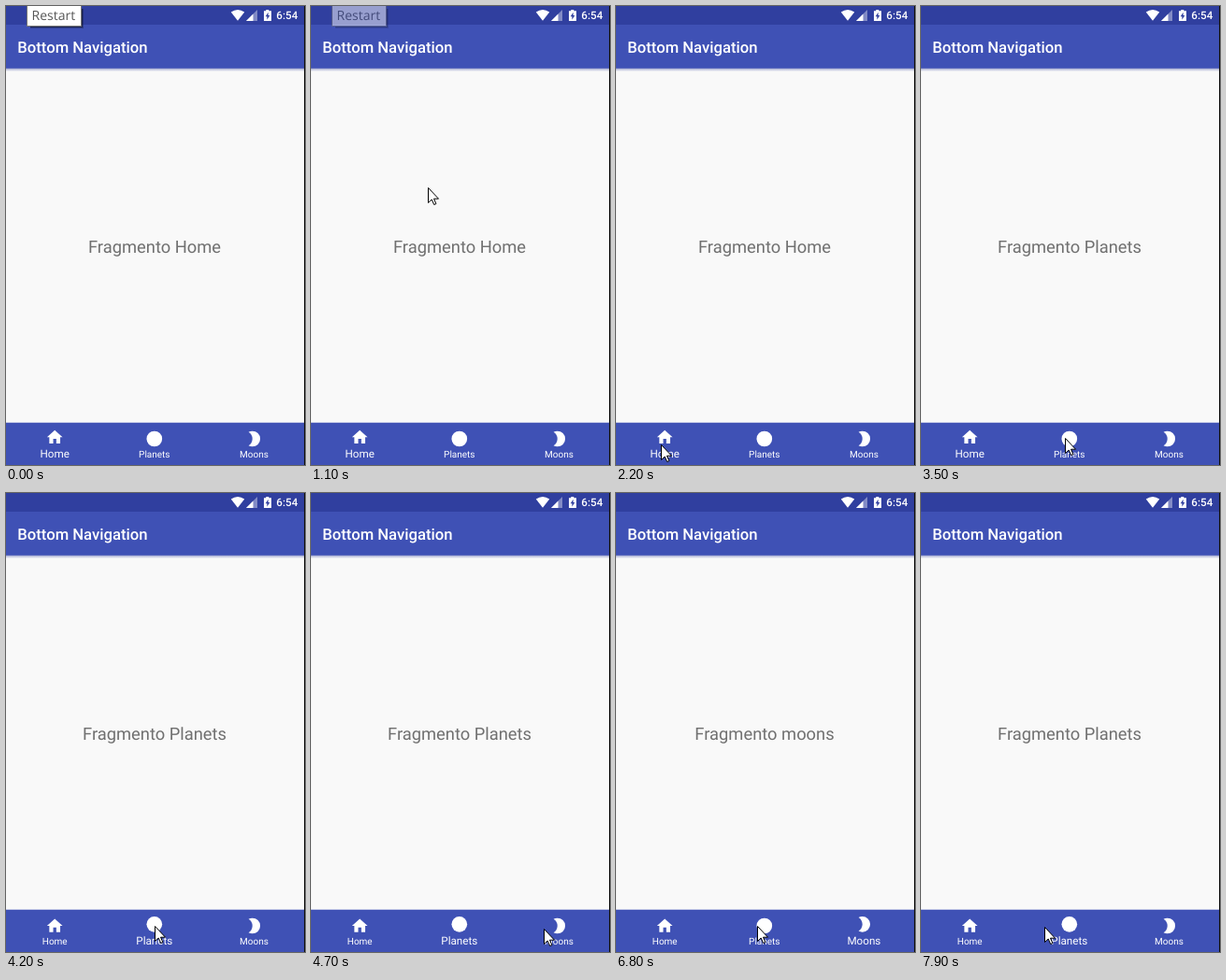
Recreate the animation shown at these times as an HTML page. Size 320 by 491 pixels, loop 8 s.

```html
<!DOCTYPE html>
<html lang="en">
<head>
<meta charset="utf-8">
<title>Bottom Navigation</title>
<style>
  html, body { margin: 0; height: 100%; overflow: hidden; background: #f9f9f9; }
  svg { display: block; width: 100vw; height: 100vh; font-family: Roboto, sans-serif; text-rendering: geometricPrecision; }
  .nav text, #page { text-anchor: middle; }
</style>
</head>
<body>
<svg viewBox="0 0 320 491">
  <linearGradient id="shade" x2="0" y2="1">
    <stop stop-color="#8f97c8"/>
    <stop offset="1" stop-color="#f9f9f9"/>
  </linearGradient>
  <rect width="320" height="491" fill="#f9f9f9"/>
  <rect y="66" width="320" height="4" fill="url(#shade)"/>
  <rect width="320" height="66.7" fill="#3f51b5"/>
  <rect width="320" height="20" fill="#303f9f"/>
  <rect y="445.7" width="320" height="46" fill="#3f51b5"/>

  <g fill="#fff">
    <path d="M248 15.7L240.8 6.6Q248 1.6 255.2 6.6Z"/>
    <path d="M269 4V16H257Z" opacity=".4"/>
    <path d="M264.5 8.5V16H257Z"/>
    <path d="M278.3 4h3v1.2h2.7V16h-8V5.2h2.3z"/>
    <path d="M280.6 6.8v3.2h1.7l-2.9 4.7v-3.5h-1.7z" fill="#303f9f"/>
    <text x="289.3" y="14.3" font-size="11.67" font-weight="500">6:54</text>
    <text x="12.3" y="50" font-size="16.67" font-weight="500">Bottom Navigation</text>
  </g>

  <text id="page" x="159" y="264" font-size="18.33" fill="#707070"></text>

  <g class="nav" fill="#fff">
    <g transform="translate(52.2)">
      <path d="M10 20v-6h4v6h5v-8h3L12 3 2 12h3v8z"/>
      <text y="483">Home</text>
    </g>
    <g transform="translate(158.8)">
      <path d="M12 2a10 10 0 1 0 0 20a10 10 0 1 0 0-20z"/>
      <text y="483">Planets</text>
    </g>
    <g transform="translate(265.4)">
      <path d="M10 2Q7.3 2 5 3.35a10 10 0 0 1 0 17.3Q7.3 22 10 22a10 10 0 0 0 0-20z"/>
      <text y="483">Moons</text>
    </g>
  </g>

  <rect x="319" width="1" height="491" fill="#111"/>

  <g id="tip">
    <rect x="26" y="3" width="57" height="21" opacity=".25"/>
    <rect x="26" y="3" width="56" height="20" opacity=".35"/>
    <rect x="22.5" y="-1.5" width="58" height="23" fill="#fff" stroke="#767676"/>
    <text x="27.5" y="15" font-size="14" fill="#575757" style="font-family:'Open Sans',sans-serif">Restart</text>
  </g>

  <path id="cursor" d="M.5.5V16.5L4.2 13L6.7 18.5L8.9 17.6L6.5 12.2H11.5Z" fill="#fff" stroke="#000"/>
</svg>
<script>
const LOOP = 8000, STEP = 100;
const pages = ["Fragmento Home", "Fragmento Planets", "Fragmento moons"];

// Pointer moves: start, duration, end point and sideways bend
const moves = [
  { at: 800, dur: 300, to: [125, 194] },
  { at: 1100, dur: 600, to: [112, 347], bend: [14, 0] },
  { at: 1700, dur: 500, to: [48, 469] },
  { at: 2900, dur: 500, to: [154, 462] },
  { at: 4100, dur: 780, to: [264, 465], bend: [0, 4] },
  { at: 6200, dur: 600, to: [151, 463], bend: [0, 8] },
  { at: 7800, dur: 100, to: [132, 464] }
];

// Taps: time, selected tab, duration of the tab animation
const taps = [
  { at: -1000, tab: 0, dur: 100 },
  { at: 3500, tab: 1, dur: 200 },
  { at: 5500, tab: 2, dur: 100 },
  { at: 7300, tab: 1, dur: 200 }
];

const get = id => document.getElementById(id);
const page = get("page"), tip = get("tip"), cursor = get("cursor");
const tabs = [...document.querySelectorAll(".nav g")].map(g => g.children);
const progress = (t, { at, dur }) => Math.max(0, Math.min(1, (t - at) / dur));
const ease = k => k * k * (3 - 2 * k);

function pointer(t) {
  let pos = [20, -40];
  for (const move of moves) {
    const k = ease(progress(t, move));
    const { to, bend = [0, 0] } = move;
    pos = pos.map((p, i) => p + (to[i] - p) * k + bend[i] * Math.sin(Math.PI * k));
  }
  return pos.map(Math.round);
}

function draw(t) {
  const n = taps.findLastIndex(tap => tap.at <= t);
  const now = taps[n], last = taps[n - 1];
  const k = progress(t, now);

  page.textContent = pages[now.tab];
  tabs.forEach(([icon, label], i) => {
    const on = i === now.tab ? k : i === last?.tab ? 1 - k : 0;
    icon.setAttribute("transform", `translate(-10 ${453 - 1.67 * on}) scale(.8333)`);
    label.setAttribute("font-size", 10 + 1.67 * on);
  });

  tip.setAttribute("opacity", 1 - progress(t, { at: 800, dur: 600 }));
  cursor.setAttribute("transform", `translate(${pointer(t)})`);
}

function tick() {
  const t = performance.now() % LOOP;
  draw(Math.floor(t / STEP) * STEP);
  requestAnimationFrame(tick);
}
tick();
</script>
</body>
</html>
```
